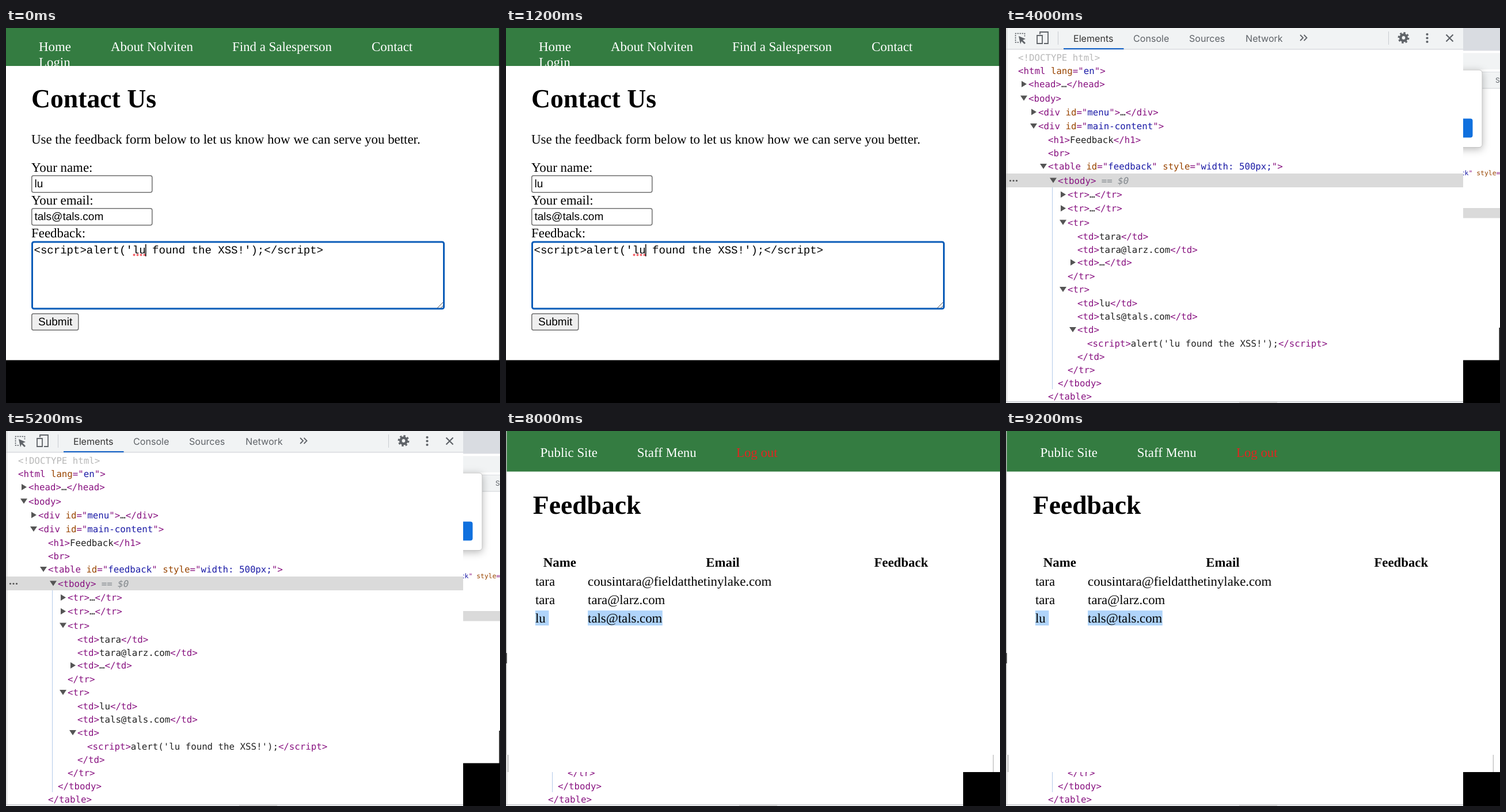
Write an HTML page that moves like this. It is 858 px wide and 652 px high and loops after 10000 ms.

```html
<!DOCTYPE html>
<html lang="en">
<head>
<meta charset="utf-8">
<title>Feedback form script demo</title>
<style>
html, body { margin: 0; width: 100%; height: 100%; overflow: hidden; background: #fff; }
svg { display: block; }
text { white-space: pre; text-rendering: geometricPrecision; }
.serif { font-family: "Liberation Serif", Times, serif; }
.bold { font-family: "Liberation Serif", Times, serif; font-weight: 700; }
.sans { font-family: "Liberation Sans", Arial, sans-serif; }
.ui { font-family: Inter, Roboto, sans-serif; }
.mono { font-family: "Liberation Mono", Courier, monospace; }
.code { font-family: "DejaVu Sans Mono", Menlo, monospace; }
</style>
</head>
<body>
<svg id="stage" width="858" height="652" viewBox="0 0 858 652"></svg>
<script>
const GREEN = '#347c41', TAG = '#881280', ATTR = '#994500', VALUE = '#1a1aa6';
const PERSON = 'lu', MAIL = 'tals@tals.com';
const ATTACK = `<script>alert('${PERSON} found the XSS!');<\/script>`;

const esc = s => s.replace(/&/g, '&amp;').replace(/</g, '&lt;').replace(/>/g, '&gt;');
const raw = (font, x, y, size, inner, fill = '#000', more = '') =>
  `<text class="${font}" x="${x}" y="${y}" font-size="${size}" fill="${fill}" ${more}>${inner}</text>`;
const text = (font, x, y, size, s, fill, more) => raw(font, x, y, size, esc(s), fill, more);
const rect = (x, y, w, h, fill, more = '') =>
  `<rect x="${x}" y="${y}" width="${w}" height="${h}" fill="${fill}" ${more}/>`;
const dot = (x, y, r, fill) => `<circle cx="${x}" cy="${y}" r="${r}" fill="${fill}"/>`;
const line = (d, color, width = 1, more = '') =>
  `<path d="${d}" fill="none" stroke="${color}" stroke-width="${width}" ${more}/>`;
const shape = (d, fill) => `<path d="${d}" fill="${fill}"/>`;
const span = (s, fill, more = '') => `<tspan fill="${fill}" ${more}>${esc(s)}</tspan>`;

// Syntax colours for one line of markup
function paint(s) {
  return s.match(/<[^>]*>?|[^<]+/g).map(part => {
    if (part.startsWith('<!')) return span(part, '#b8b8b8');
    if (part.startsWith(' ==')) return span(part, '#80868b', 'font-style="italic"');
    if (part[0] !== '<') return span(part, '#222');
    return part.split(/(\w+=(?:"[^"]*")?)/).map(bit => {
      const m = bit.match(/^(\w+)=(?:"(.*)")?$/);
      if (!m) return span(bit, TAG);
      return span(m[1], ATTR) + span(m[2] ? '="' : '=', TAG) +
        (m[2] ? span(m[2], VALUE) + span('"', TAG) : '');
    }).join('');
  }).join('');
}

// Rows are [x, baseline, markup]; a leading + or - marks a closed or open node
function tree(size, rows) {
  const k = size / 15.75;
  const arrows = { '+': 'M-12-11l9 5.5l-9 5.5z', '-': 'M-14-10h12l-6 9z' };
  return rows.map(([x, y, s]) => {
    const arrow = arrows[s[0]];
    return (arrow ? `<path transform="translate(${x} ${y}) scale(${k})" d="${arrow}" fill="#555"/>` : '') +
      raw('code', x, y, size, paint(arrow ? s.slice(1) : s));
  }).join('');
}

function staffPage(x, y, scale, width, people, selected) {
  const row = ([name, mail], i) => {
    const base = 188.8 + 22.4 * i;
    return text('serif', 35, base, 16, name) + text('serif', 99, base, 16, mail);
  };
  return `<g transform="translate(${x} ${y}) scale(${scale})">` +
    rect(0, 0, width / scale, 49.5, GREEN) +
    text('serif', 41, 31.7, 16, 'Public Site', '#fff') +
    text('serif', 159.2, 31.7, 16, 'Staff Menu', '#fff') +
    text('serif', 280, 31.7, 16, 'Log out', '#e3241f') +
    text('bold', 32.2, 101, 32, 'Feedback') +
    text('bold', 44.8, 165.6, 16, 'Name') +
    text('bold', 243, 165.6, 16, 'Email') +
    text('bold', 448, 165.6, 16, 'Feedback') +
    (selected ? rect(35, 219, 16.5, 18.3, '#b0d4fa') + rect(99, 219, 91, 18.3, '#b0d4fa') : '') +
    people.map(row).join('') + '</g>';
}

const people = [
  ['tara', 'cousintara@fieldatthetinylake.com'],
  ['tara', 'tara@larz.com'],
  [PERSON, MAIL]
];

function contactForm() {
  const menu = [[57, 40, 'Home'], [182, 40, 'About Nolviten'], [393, 40, 'Find a Salesperson'],
    [635, 40, 'Contact'], [57, 67, 'Login']];
  const labels = [[201, 'Use the feedback form below to let us know how we can serve you better.'],
    [250, 'Your name:'], [307, 'Your email:'], [364, 'Feedback:']];
  const box = (y, w, h, fill) => rect(44.75, y + .75, w, h, fill, 'rx="3" stroke="#6f6f6f" stroke-width="1.5"');
  return rect(0, 0, 858, 652, '#fff') + rect(0, 0, 858, 66, GREEN) +
    menu.map(([x, y, s]) => text('serif', x, y, 22.9, s, '#fff')).join('') +
    text('bold', 44, 138, 45.7, 'Contact Us') +
    labels.map(([y, s]) => text('serif', 44, y, 22.9, s)).join('') +
    box(256, 209, 29, '#fff') + text('sans', 49.5, 277, 19.05, PERSON) +
    box(313, 209, 29, '#fff') + text('sans', 49.5, 334, 19.05, MAIL) +
    rect(45.5, 372, 715, 116, '#fff', 'rx="3" stroke="#0b5cb8" stroke-width="3"') +
    text('mono', 48.5, 392, 19.05, ATTACK) +
    [222.5, 228.5, 234.5, 240.5].map(x => dot(x, 394.5, 2, '#f4636a')).join('') +
    rect(242, 376, 1.5, 21, '#000') +
    line('M749 487l10-10M755 487l4-4', '#555') +
    box(496, 81, 28.5, '#efefef') + text('sans', 56, 517, 19.05, 'Submit') +
    rect(856.5, 0, 1.5, 578, '#111') + rect(0, 577.5, 858, 75, '#000');
}

function alertWindow() {
  const chrome = rect(0, 0, 858, 521, '#fff') + rect(0, 0, 858, 39.5, '#d9dce1') +
    dot(27.8, 18, 6.4, '#f1584f') + dot(48.5, 18, 6.4, '#f4bc33') + dot(69, 18, 6.4, '#2bb53e') +
    shape('M88 40q8 0 8-8V13q0-8 8-8H335q8 0 8 8V32q0 8 8 8z', '#fff') +
    line('M112 27.6A7.3 7.3 0 1 1 122.5 26', '#2a6fd6', 2.4) +
    text('ui', 133, 26, 12.4, 'Staff: Feedback', '#3c4043') +
    line('M323 18l8 8m0-8l-8 8', '#3c4043', 1.6) +
    line('M360 22h12m-6-6v12', '#3c4043', 2) +
    line('M29 58H17m6-6l-6 6l6 6', '#55595e', 1.8) +
    line('M49 58h12m-6-6l6 6l-6 6', '#b5b8bc', 1.8) +
    line('M83 52l11 11m0-11l-11 11', '#55595e', 1.8) +
    rect(112, 43.5, 780, 28.5, '#f1f3f4', 'rx="14"') +
    shape('M130 52l6.5 11.5h-13z', '#c5281f') + rect(129.3, 56, 1.4, 3.5, '#fff') + rect(129.3, 60.5, 1.4, 1.4, '#fff') +
    text('ui', 146, 63, 14.2, 'Not Secure', '#c5281f') + rect(230.5, 50, 1, 16, '#a5a8ac') +
    text('ui', 240, 63, 14.2, 'https', '#c5281f') + rect(240, 57.5, 37, 1.2, '#c5281f') +
    text('ui', 277, 63, 14.2, '://', '#5f6368') +
    text('ui', 289, 63, 14.5, '104.198.208.81', '#202124') +
    text('ui', 394, 63, 14.1, '/green/public/staff/feedback/index.php', '#5f6368') +
    rect(0, 76, 858, 1, '#dcdfe3');
  const tools = rect(621, 77, 237, 444, '#fff') + rect(621, 77, 1, 443, '#bfbfbf') +
    rect(622, 77, 236, 28, '#f1f3f4') + rect(622, 104.5, 236, 1, '#cfd2d6') +
    text('ui', 850, 95, 12, 'Sources', '#5f6368') +
    rect(622, 313, 236, 17.5, '#dadada') + [626.5, 630.5, 634.5].map(x => dot(x, 322, 1.2, '#555')).join('') +
    tree(11.42, [
      [673, 222, '<h1>Feedback</h1>'], [673, 239, '<br>'],
      [673, 255.5, '-<table id="feedback" style='], [686, 273, '-<tbody>'],
      [698, 290.5, '+<tr>…</tr>'], [698, 308, '+<tr>…</tr>'], [698, 325.5, '-<tr> == $0'],
      [698, 356, '+<tr>…</tr>'], [686, 373.5, '</tbody>'], [673, 390, '</table>'],
      [661, 406, '</div>'], [648, 422.5, '</body>'], [636, 439, '</html>']
    ]);
  const dialog = rect(365, 73, 462, 134.5, '#fff',
      'rx="5" stroke="#c4c4c4" style="filter:drop-shadow(0 3px 7px rgba(0,0,0,.28))"') +
    text('ui', 381, 106, 15.6, '104.198.208.81 says', '#202124') +
    text('ui', 381, 136, 13.3, `${PERSON} found the XSS!`, '#202124') +
    rect(744.5, 157.5, 66, 33, '#1070de', 'rx="4"') +
    text('ui', 777.5, 178.5, 12.5, 'OK', '#fff', 'font-weight="600" text-anchor="middle"');
  return chrome + staffPage(0, 77, 1.028, 621, people.slice(0, 2)) + tools + dialog;
}

function inspector() {
  const ink = '#5f6368';
  const tabs = [[117, 'Elements'], [221, 'Console'], [318, 'Sources'], [416, 'Network']];
  return rect(0, 0, 794, 652, '#fff') + rect(0, 0, 794, 37, '#f1f3f4') + rect(0, 36.5, 794, 1, '#c9ccd1') +
    line('M22 25h-5.500V9.500h16v5', ink, 1.5, 'stroke-dasharray="2.5 1.5"') +
    shape('M22 14l12 5l-5 2l5 5l-2 2l-5-5l-2 5z', ink) +
    line('M59 11V7h14v20h-7', ink, 1.8) + line('M54 13h9v14h-9z', ink, 1.8) +
    rect(90, 6, 1, 23, '#c9ccd1') + rect(664, 6, 1, 23, '#c9ccd1') +
    tabs.map(([x, s], i) => text('ui', x, 24, 16.1, s, i ? ink : '#333')).join('') +
    rect(100, 35, 104.5, 2.2, '#1a66c8') +
    line('M511 12l5 5l-5 5M517.500 12l5 5l-5 5', ink, 1.8) +
    `<circle cx="690.5" cy="17" r="5.2" fill="none" stroke="${ink}" stroke-width="4.6"/>` +
    `<circle cx="690.5" cy="17" r="8.4" fill="none" stroke="${ink}" stroke-width="3" pathLength="16" stroke-dasharray="1 1"/>` +
    [11, 17.5, 24].map(y => dot(731.5, y, 2.1, ink)).join('') +
    line('M764.500 11.500l12 12m0-12l-12 12', ink, 2.2) +
    rect(0, 253, 794, 24, '#dadada') + [7.5, 13, 18.5].map(x => dot(x, 265.5, 1.6, '#555')).join('') +
    rect(80, 277, 1, 351, '#b4cbe9') + rect(1, 0, 1, 650, '#c4c4c4') +
    rect(0, 649, 794, 3, '#f1f3f4') + rect(0, 649, 794, 1.3, '#c6c8cc') + rect(405, 650, 66, 2, '#d8d8d8') +
    tree(15.75, [
      [21, 57, '<!DOCTYPE html>'], [21, 80, '<html lang="en">'],
      [39, 103, '+<head>…</head>'], [39, 127.5, '-<body>'],
      [56, 151.5, '+<div id="menu">…</div>'], [56, 176, '-<div id="main-content">'],
      [73, 200, '<h1>Feedback</h1>'], [73, 223, '<br>'],
      [73, 246, '-<table id="feedback" style="width: 500px;">'], [90, 270.5, '-<tbody> == $0'],
      [107, 295, '+<tr>…</tr>'], [107, 319, '+<tr>…</tr>'], [107, 343.5, '-<tr>'],
      [124, 367.5, '<td>tara</td>'], [124, 390.5, '<td>tara@larz.com</td>'],
      [124, 413, '+<td>…</td>'], [107, 437, '</tr>'], [107, 460, '-<tr>'],
      [124, 484, `<td>${PERSON}</td>`], [124, 507, `<td>${MAIL}</td>`], [124, 530, '-<td>'],
      [141, 554, ATTACK], [124, 577, '</td>'], [107, 600, '</tr>'],
      [90, 623, '</tbody>'], [73, 646, '</table>']
    ]);
}

function results() {
  return rect(0, 0, 858, 593, '#fff') + rect(0, 0, 4, 593, '#dedede') +
    [9, 252, 427, 469, 553].map(y => rect(0, y, 4, 1, '#a0a0a0')).join('') + rect(0, 303, 4, 6, '#c4c4c4') +
    line('M0 378q4 3 4 10H0M0 398q3 0 4-3', '#333', 2.5) +
    rect(847, 0, 11, 38, '#f1f3f4') + rect(847, 38, 11, 1, '#c9ccd1') +
    rect(848, 250, 10, 24, '#dadada') + dot(852.5, 262, 1.5, '#555') + dot(857, 262, 1.5, '#555') +
    staffPage(4, 1.5, 1.394, 842, people) +
    rect(0, 0, 858, 1.3, '#bdbdbd') + rect(3.5, 0, 1, 593, '#b8b8b8') + rect(845.7, 0, 1.2, 593, '#b8b8b8');
}

function highlighted() {
  return rect(0, 0, 858, 563, '#fff') + staffPage(1, 0, 1.425, 857, people, true) +
    rect(0, 0, 1.4, 563, '#bdbdbd') + rect(0, 386, 1.5, 18, '#333');
}

// Each layer covers part of the ones before it
const stage = document.getElementById('stage');
stage.innerHTML = [contactForm, alertWindow, inspector, results, highlighted]
  .map(draw => `<g>${draw()}</g>`).join('');
const layers = [...stage.children];

function tick() {
  const step = Math.floor(performance.now() % 10000 / 2000);
  layers.forEach((layer, i) => { layer.style.display = i <= step ? '' : 'none'; });
  requestAnimationFrame(tick);
}
tick();
</script>
</body>
</html>
```
